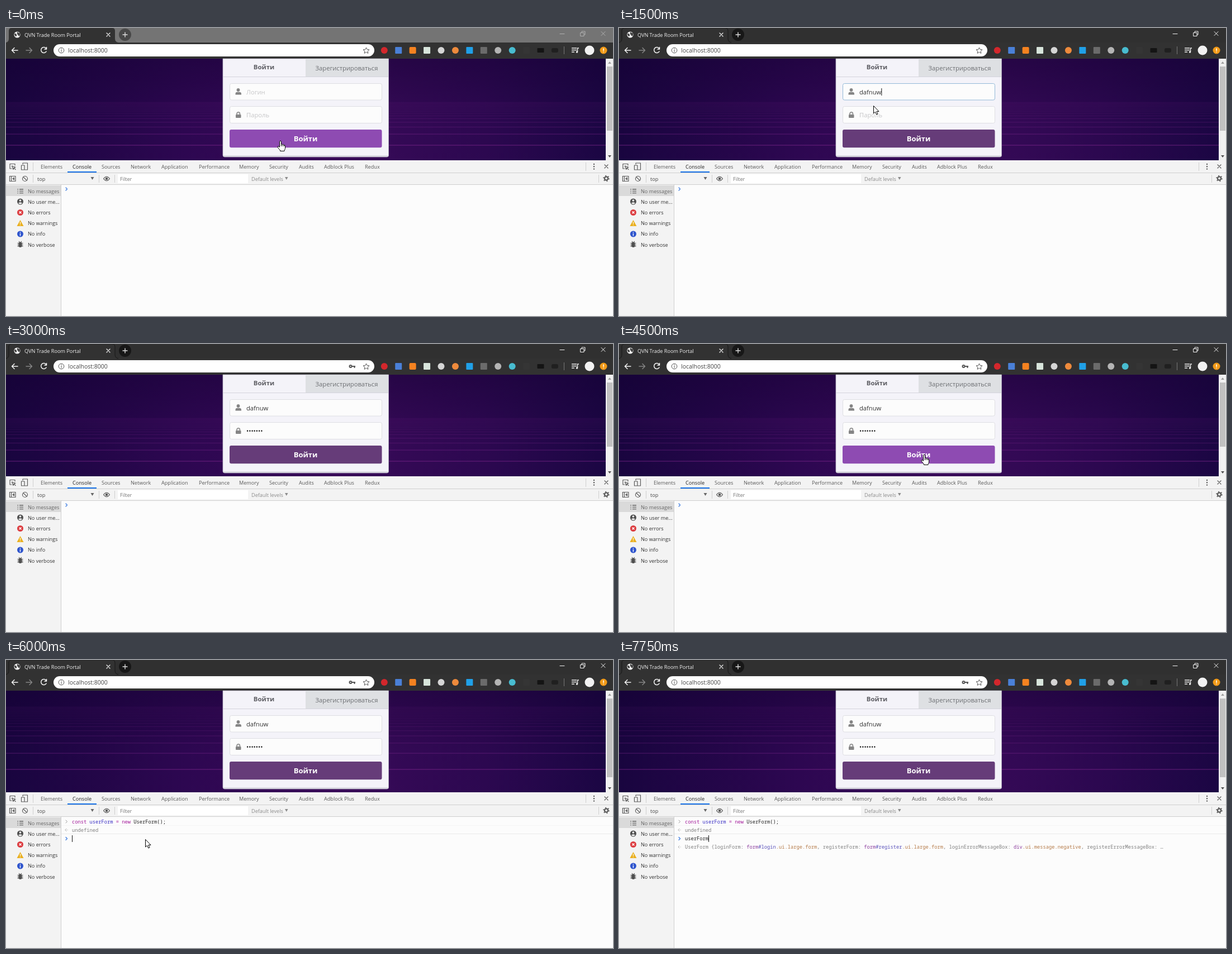
Write an HTML page that moves like this. It is 1086 px wide and 516 px high and loops after 8000 ms.

```html
<!DOCTYPE html>
<html lang="ru">
<head>
<meta charset="utf-8">
<title>Login form and console</title>
<style>
html, body { margin: 0; width: 100%; height: 100%; overflow: hidden; background: #fcfcfc; }
svg { display: block; width: 1086px; height: 516px; }
text { font: 9.1px "Open Sans", "Noto Sans", sans-serif; fill: #444; white-space: pre; }
.form text { font-size: 11.2px; }
.form .b { font-weight: 700; }
.mono text { font: 8.75px "Noto Sans Mono", "DejaVu Sans Mono", monospace; fill: #222; }
.mono .b { font-weight: 700; }
.mid { text-anchor: middle; }
.kw { fill: #a3189a; } .def { fill: #3a2fc4; }
.mono .dim { fill: #808080; }
.tag { fill: #8a3a9c; } .id { fill: #5a52bb; } .cls { fill: #b57a48; }
.ln { fill: none; stroke-linecap: round; stroke-linejoin: round; }
</style>
</head>
<body>
<svg viewBox="0 0 1086 516">
  <defs>
    <linearGradient id="sky">
      <stop offset="0" stop-color="#19053f"/><stop offset=".3" stop-color="#2d0751"/>
      <stop offset=".55" stop-color="#390a59"/><stop offset=".8" stop-color="#2c0850"/>
      <stop offset="1" stop-color="#1b0643"/>
    </linearGradient>
    <linearGradient id="shade" x2="0" y2="1">
      <stop offset="0" stop-color="#12002e" stop-opacity=".4"/>
      <stop offset=".6" stop-color="#12002e" stop-opacity="0"/>
    </linearGradient>
    <clipPath id="view"><path d="M0 55H1073V237H0Z"/></clipPath>
  </defs>

  <!-- browser frame -->
  <path id="strip" d="M0 0H1086V27H0Z"/>
  <path d="M0 26H1086V55H0Z" fill="#323232"/>
  <path d="M0 26Q5 25 5 19V5Q5 0 10 0H190Q195 0 195 5V19Q195 25 201 26Z" fill="#323232"/>
  <path id="edge" d="M0 26Q5 25 5 19V5Q5 0 10 0H190Q195 0 195 5V19Q195 25 201 26" fill="none" stroke="#171717"/>
  <circle cx="20" cy="12" r="5.6" fill="#f4f4f4"/>
  <path d="M15 10Q18 9 19 12T17 15Q15 13 15 10M20 7Q23 9 25 9L25 13Q23 16 22 13Q19 11 20 7" fill="#444"/>
  <text x="33" y="15.5" style="fill:#f0f0f0">QVN Trade Room Portal</text>
  <path class="ln" d="M180 9l6 6m0-6l-6 6" stroke="#eee" stroke-width="1.3"/>
  <circle id="plus" cx="213" cy="12" r="11"/>
  <path class="ln" d="M213 8v8m-4-4h8" stroke="#ddd" stroke-width="1.4"/>
  <path id="wins" class="ln" d="M991 10.5h8M1028 8.5h6v6h-6ZM1030 8v-2h6v6h-2M1065 6.5l7 7m0-7l-7 7"/>
  <g class="ln" stroke-width="1.5">
    <path d="M21 40H11M15 35.5L10.5 40L15 44.5M72 37A5 5 0 1 0 72 42M72.5 34.5V38H69" stroke="#f4f4f4"/>
    <path d="M36 40H46M42 35.5L46.5 40L42 44.5" stroke="#858585"/>
  </g>
  <rect x="85" y="29" width="574" height="22" rx="11" fill="#fff"/>
  <circle cx="99" cy="40" r="4.8" fill="none" stroke="#555"/>
  <path d="M99 39.5v3M99 37v1.2" stroke="#555" stroke-width="1.2"/>
  <text x="111" y="44" style="font-size:10.5px;fill:#444">localhost:8000</text>
  <g id="key" fill="none" stroke="#555" stroke-width="2"><circle cx="616.5" cy="40" r="2"/><path d="M619 40h6m-1.5 0v3"/></g>
  <path d="M644.5 35l1.6 3.5 3.9.4-2.9 2.6.8 3.8-3.4-2-3.4 2 .8-3.8-2.9-2.6 3.900-.4Z" fill="none" stroke="#555"/>
  <g id="ext"></g>
  <path d="M998.5 33v14" stroke="#777"/>
  <path d="M1012 36h9m-9 3.5h9m-9 3.5h5M1022.5 42.5V36h2.5" fill="none" stroke="#eee" stroke-width="1.4"/>
  <circle cx="1021.5" cy="43" r="1.8" fill="#eee"/>
  <circle cx="1044" cy="40" r="8.5" fill="#f2f2f2"/>
  <circle cx="1069" cy="40" r="6.5" fill="#f29a18"/>
  <path d="M1069 36.5v4.5m0 1.2v1.4" stroke="#fff" stroke-width="1.5"/>

  <!-- page -->
  <g clip-path="url(#view)">
    <path d="M0 55H1073V237H0Z" fill="url(#sky)"/>
    <path d="M0 55H1073V237H0Z" fill="url(#shade)"/>
    <g id="gridA"></g><g id="gridB"></g>
  </g>
  <path d="M1073.5 55H1086V237H1073.5Z" fill="#f1f1f1"/>
  <rect id="thumb" x="1075" y="69" width="10" fill="#c1c1c1"/>
  <path d="M1077 64l3-4 3 4Z" fill="#a0a0a0"/><path d="M1077 228l3 4 3-4Z" fill="#505050"/>

  <g class="form">
    <path d="M388 55H684.5V228Q684.5 231 681.5 231H391Q388 231 388 228Z" fill="#f4f3f9" stroke="#b9b4c4" stroke-width=".8"/>
    <path d="M389 229.5H683" stroke="#c9cbd2" stroke-width="1.5"/>
    <path d="M536 55H684V87H536Z" fill="#dee0e3"/>
    <path d="M388 87.5H684" stroke="#d4d4dc"/>
    <text class="b mid" x="461.5" y="74" style="font-size:11.4px;fill:#5c5c62">Войти</text>
    <text class="mid" x="609.5" y="76" style="fill:#6c6e72">Зарегистрироваться</text>
    <rect id="box1" x="400.5" y="99.5" width="272" height="29.5" rx="3" fill="#fcfcfc"/>
    <rect id="box2" x="400.5" y="140.5" width="272" height="30" rx="3" fill="#fcfcfc"/>
    <g fill="#858585">
      <circle cx="415.5" cy="111" r="2.9"/><path d="M410.5 119.5V118Q410.5 114.8 413.5 114.8H417.5Q421 114.8 421 118V119.5Z"/>
      <rect x="411" y="155" width="9.5" height="6" rx="1"/>
    </g>
    <path d="M413 155.5V153.5A2.7 2.7 0 0 1 418.4 153.5V155.5" fill="none" stroke="#858585" stroke-width="1.6"/>
    <text id="ph1" x="430" y="119" style="fill:#c6c6c8">Логин</text>
    <text id="ph2" x="430" y="160" style="fill:#c6c6c8">Пароль</text>
    <text id="login" x="430" y="119" style="fill:#333"></text>
    <text id="pass" x="430" y="160" style="fill:#222"></text>
    <rect id="btn" x="400" y="182" width="272.5" height="32.3" rx="3"/>
    <text class="b mid" x="536" y="203" style="font-size:13px;fill:#fff">Войти</text>
  </g>

  <!-- devtools -->
  <path d="M0 237H1086V281H0Z" fill="#f3f3f3"/>
  <path d="M99 281H1086V516H99Z" fill="#fcfcfc"/>
  <path d="M0 281H98V516H0Z" fill="#f3f3f3"/>
  <path d="M0 282H98V301H0Z" fill="#dadada"/>
  <path d="M0 259.5H1086M0 280.5H1086M98.5 281V516M48.5 241V256M1037.5 241V256M48.5 263V277M166.5 263V277M194.5 263V277M1060.5 263V277" stroke="#cfcfcf"/>
  <path d="M110 257H162V259H110Z" fill="#1a73e8"/>
  <path d="M200 262H433V278H200Z" fill="#fff"/>
  <g id="tabs"></g>
  <text x="56" y="273.5">top</text><path d="M151.5 267h6l-3 5Z" fill="#666"/>
  <text x="204" y="274" style="fill:#757575">Filter</text>
  <text x="439" y="273.5" style="fill:#8b8b8b">Default levels</text><path d="M499 267h5.5l-2.7 5Z" fill="#8b8b8b"/>
  <g class="ln" stroke="#5a5a5a" stroke-width="1.2">
    <path d="M10 252H7V243.5H16V246M10.5 247L17 249.5 14 250.5 13 253.5ZM14.5 251L17 253.5M30 244V242H38.5V254H34M27.5 246H33V254H27.5Z"/>
    <path d="M6.5 265.5H17V274.5H6.5ZM9.5 265.5V274.5M14.5 268L12 270 14.5 272Z"/>
    <circle cx="34" cy="270" r="4.5"/><path d="M31 267L37 273"/>
    <path d="M174.5 270Q180 262.5 185.5 270Q180 277.5 174.5 270Z"/><circle cx="180" cy="270" r="1.7" fill="#5a5a5a"/>
    <path d="M1071 245l6 6m0-6l-6 6"/>
    <circle cx="1074" cy="269.5" r="3.1" stroke-width="2.3"/>
    <circle cx="1074" cy="269.5" r="5" stroke-width="1.6" stroke-dasharray="1.9 3.336" stroke-linecap="butt"/>
  </g>
  <g fill="#5a5a5a"><circle cx="1052" cy="244" r="1.2"/><circle cx="1052" cy="248.3" r="1.2"/><circle cx="1052" cy="252.6" r="1.2"/></g>
  <path d="M20.5 289h1.5m2 0h7M20.5 292.3h1.5m2 0h7M20.5 295.6h1.5m2 0h7" stroke="#666" stroke-width="1.3"/>
  <circle cx="25.5" cy="311" r="5.5" fill="#505050"/>
  <circle cx="25.5" cy="309" r="1.8" fill="#fff"/><path d="M22 313.8Q25.5 310.5 29 313.8Q25.5 317 22 313.8" fill="#fff"/>
  <circle cx="25.5" cy="330.5" r="5.5" fill="#dc3c40"/><path d="M23.5 328.5l4 4m0-4l-4 4" stroke="#fff" stroke-width="1.3"/>
  <path d="M25.5 344L31.5 355H19.5Z" fill="#eab020"/><path d="M25.5 347.5v3.5m0 1.2v1.4" stroke="#fff" stroke-width="1.2"/>
  <circle cx="25.5" cy="369" r="5.5" fill="#2f55cd"/><path d="M25.5 365.5v1.5m0 1v4.5" stroke="#fff" stroke-width="1.4"/>
  <rect x="22.5" y="383.5" width="6" height="9.5" rx="3" fill="#505050"/>
  <path d="M20.5 385.5h10m-10 2.7h10m-10 2.7h10M23 382l1.5 2m3.5-2l-1.5 2" stroke="#505050" stroke-width="1.1"/>
  <g id="side"></g>

  <g class="mono">
    <path id="mark" class="ln" d="M107 -5.5l2.5 2.5-2.5 2.5" stroke="#3b7be0" stroke-width="1.3"/>
    <text id="cmd" x="118"><tspan class="kw">const</tspan> <tspan class="def">userForm</tspan> <tspan class="kw">=</tspan> <tspan class="kw">new</tspan> UserForm();</text>
    <g id="out">
      <path d="M99 296.5H1086" stroke="#f4f4f4"/><path d="M99 311.5H1086" stroke="#e9e9e9"/>
      <path class="ln" d="M107 287l2.5 2.5-2.5 2.5M108 302.5l-2 2 2 2m2-2h.1" stroke="#999"/>
      <text class="dim" x="118" y="307.5">undefined</text>
    </g>
    <text x="118" y="323"><tspan id="typed"></tspan><tspan id="hint" class="dim"></tspan></text>
    <g id="preview">
      <path class="ln" d="M108 333l-2 2 2 2m2-2h.1" stroke="#aaa"/>
      <text class="dim" x="118" y="338">UserForm {loginForm: <tspan class="tag">form</tspan><tspan class="id">#login</tspan><tspan class="cls">.ui.large.form</tspan>, registerForm: <tspan class="tag">form</tspan><tspan class="id">#register</tspan><tspan class="cls">.ui.large.form</tspan>, loginErrorMessageBox: <tspan class="tag">div</tspan><tspan class="cls">.ui.message.negative</tspan>, registerErrorMessageBox: …</text>
    </g>
    <g id="popup"></g>
  </g>
  <path id="caret" stroke="#111"/>

  <g id="arrow"><path d="M.5 .5V14L3.6 11.3 5.7 16 8 15 5.9 10.5H10Z" fill="#fff" stroke="#000"/></g>
  <g id="hand"><path d="M-1.5 1.2Q0 -.8 1.4 1.2V6.5Q3 5.5 4 7Q5.5 6.2 6.5 7.8Q8.5 7.5 8.5 9.5V13.5Q8.3 15.5 7 17V18.5H-.5V17Q-2.5 15 -5 11.5Q-5 9.3 -2.9 10L-1.5 11.5Z" fill="#fff" stroke="#000"/><path d="M1.4 7v3M4 7.5v2.5M6.5 8v2" stroke="#000"/></g>
  <path id="beam" d="M-2 -4H2M0 -4V4M-2 4H2" stroke="#dfe9f8" fill="none"/>
</svg>
<script>
const $ = id => document.getElementById(id);
const set = (id, attrs) => { for (const k in attrs) $(id).setAttribute(k, attrs[k]); };
const show = (id, on) => { $(id).style.display = on ? '' : 'none'; };
const label = (x, y, s, style = '') => `<text x="${x}" y="${y}" style="${style}">${s}</text>`;

// toolbar extensions: fill, corner radius, height
$('ext').innerHTML = [
  ['#d3272c', 6], ['#4a80d8', 1], ['#f58220', 2], ['#d8e5dc', 1], ['#d5d5d5', 6], ['#ee8a3c', 6],
  ['#20a0e8', 1], ['#6b6b6b', 1], ['#b4b4b4', 6], ['#48bcd0', 6], ['#353535', 1], ['#141414', 1, 8], ['#202020', 3, 8]
].map(([c, r, h = 12], i) => `<rect x="${670.8 + i * 25.43}" y="${40 - h / 2}" width="12" height="${h}" rx="${r}" fill="${c}"/>`).join('');

$('tabs').innerHTML = [['Elements', 62], ['Console', 119], ['Sources', 171], ['Network', 223], ['Application', 278],
  ['Performance', 345], ['Memory', 417], ['Security', 471], ['Audits', 524], ['Adblock Plus', 569], ['Redux', 642]
].map(([s, x]) => label(x, 252, s, x === 119 ? 'fill:#222' : 'fill:#5a5a5a')).join('');

$('side').innerHTML = ['No messages', 'No user me...', 'No errors', 'No warnings', 'No info', 'No verbose']
  .map((s, i) => label(39, 295.8 + i * 19.15, s, i ? 'fill:#333' : 'fill:#666')).join('');

// floor lines receding to a horizon
function grid(id, horizon, depth) {
  let s = '';
  for (let i = 0; i < 22; i++) {
    const k = 3.55 / (3.55 + i);
    s += `<path d="M0 ${horizon + depth * k}H1073" stroke="#8d2c98" stroke-width="${.6 + 1.4 * k}" opacity="${.03 + .3 * k}"/>`;
  }
  $(id).innerHTML = s;
}
grid('gridA', 120, 90);
grid('gridB', 65, 131);

const usb = ['USB', 'USBAlternateInterface', 'USBConfiguration', 'USBConnectionEvent', 'USBDevice', 'USBEndpoint'];
const lists = {
  u: ['undefined', 'unescape', 'userForm', 'UIEvent', 'URIError', 'URL', 'URLSearchParams', ...usb],
  us: ['userForm', ...usb]
};

function popup(typed) {
  const items = lists[typed];
  if (!items) return '';
  const n = typed.length, h = Math.min(190, items.length * 14.35 + 1);
  const rows = items.map((s, i) => `<text x="117" y="${338.3 + i * 14.35}" ${i ? '' : 'class="b" style="fill:#fff"'}>` +
    `<tspan class="b">${s.slice(0, n)}</tspan>${s.slice(n)}</text>`).join('');
  const bar = items.length > 8 ? `<path d="M343 328H357V516H343Z" fill="#f1f1f1"/>
    <path d="M345 342H355V355H345Z" fill="#c1c1c1"/><path d="M347 337l3-4 3 4Z" fill="#a0a0a0"/>` : '';
  return `<rect x="115" y="328" width="242" height="${h}" fill="#fff" stroke="#d4d4d4"/>
    <path d="M115 328H${bar ? 343 : 357}V342H115Z" fill="#1a6fe8"/>${rows}${bar}`;
}

// state changes, each kept until overridden
const steps = [
  [0, { cur: 'hand', x: 491, y: 202, hover: 1, active: 0, login: '', pass: 0, focus: '', caret: 0, key: 0, cmd: 0, out: 0, typed: '', hint: '', preview: 0 }],
  [250, { x: 487, y: 187 }],
  [500, { cur: 'arrow', x: 468, y: 132, hover: 0 }],
  [750, { x: 460, y: 117, active: 1, focus: 'login', caret: 1 }],
  [1000, { x: 455, y: 139, login: 'da' }],
  [1250, { login: 'dafn' }],
  [1500, { login: 'dafnuw' }],
  [1750, { x: 456, y: 150, focus: 'pass' }],
  [2000, { cur: '', pass: 2, key: 1 }],
  [2250, { pass: 5 }],
  [2500, { pass: 7 }],
  [2750, { caret: 0 }],
  [3000, { focus: '' }],
  [3250, { cur: 'arrow', x: 520, y: 172 }],
  [3500, { cur: 'hand', x: 534, y: 194, hover: 1 }],
  [3750, { x: 545, y: 208 }],
  [4000, { x: 548, y: 203 }],
  [4250, { x: 546, y: 198 }],
  [4750, { cur: 'arrow', x: 355, y: 291, hover: 0 }],
  [5000, { x: 243, y: 321, focus: 'console', caret: 1 }],
  [5250, { cmd: 1 }],
  [5750, { out: 1 }],
  [6000, { x: 249, y: 321 }],
  [6250, { cur: 'beam', x: 254, y: 331 }],
  [7000, { typed: 'u', hint: 'ndefined' }],
  [7250, { cur: '', typed: 'us', hint: 'erForm' }],
  [7500, { typed: 'userForm', hint: '' }],
  [7750, { preview: 1 }]
];

function caretPos(s) {
  if (s.focus === 'login') return [430.5 + $('login').getComputedTextLength(), 108, 121];
  if (s.focus === 'pass') return [430.5 + $('pass').getComputedTextLength(), 149, 162];
  if (s.out) return [118.5 + $('typed').getComputedTextLength(), 314, 326];
  return [118.5 + (s.cmd ? $('cmd').getComputedTextLength() : 0), 283, 294];
}

function draw(s) {
  set('strip', { fill: s.active ? '#303030' : '#747474' });
  set('plus', { fill: s.active ? '#171717' : '#484848' });
  set('wins', { stroke: s.active ? '#f4f4f4' : '#b0b0b0' });
  show('edge', s.active);
  show('key', s.key);
  show('gridA', !s.out);
  show('gridB', s.out);
  set('thumb', { height: s.out ? 141 : 115 });

  $('login').textContent = s.login;
  $('pass').textContent = '•'.repeat(s.pass);
  show('ph1', !s.login);
  show('ph2', !s.pass);
  set('box1', { stroke: s.focus === 'login' ? '#93b9d8' : '#dedee3' });
  set('box2', { stroke: s.focus === 'pass' ? '#93b9d8' : '#dedee3' });
  set('btn', { fill: s.hover ? '#8e4bb2' : '#663c79' });

  show('cmd', s.cmd);
  set('cmd', { y: s.out ? 292.5 : 291.8 });
  set('mark', { transform: `translate(0 ${s.out ? 323 : 291.5})` });
  show('out', s.out);
  $('typed').textContent = s.typed;
  $('hint').textContent = s.hint;
  show('preview', s.preview);
  $('popup').innerHTML = popup(s.typed);

  const [x, top, bottom] = caretPos(s);
  show('caret', s.caret);
  set('caret', { d: `M${x} ${top}V${bottom}` });
  for (const id of ['arrow', 'hand', 'beam']) {
    show(id, s.cur === id);
    set(id, { transform: `translate(${s.x} ${s.y})` });
  }
}

let last = -1;
function tick() {
  const t = performance.now() % 8000;
  const past = steps.filter(([at]) => at <= t);
  if (past.length !== last) {
    last = past.length;
    draw(Object.assign({}, ...past.map(p => p[1])));
  }
  requestAnimationFrame(tick);
}
tick();
</script>
</body>
</html>
```
